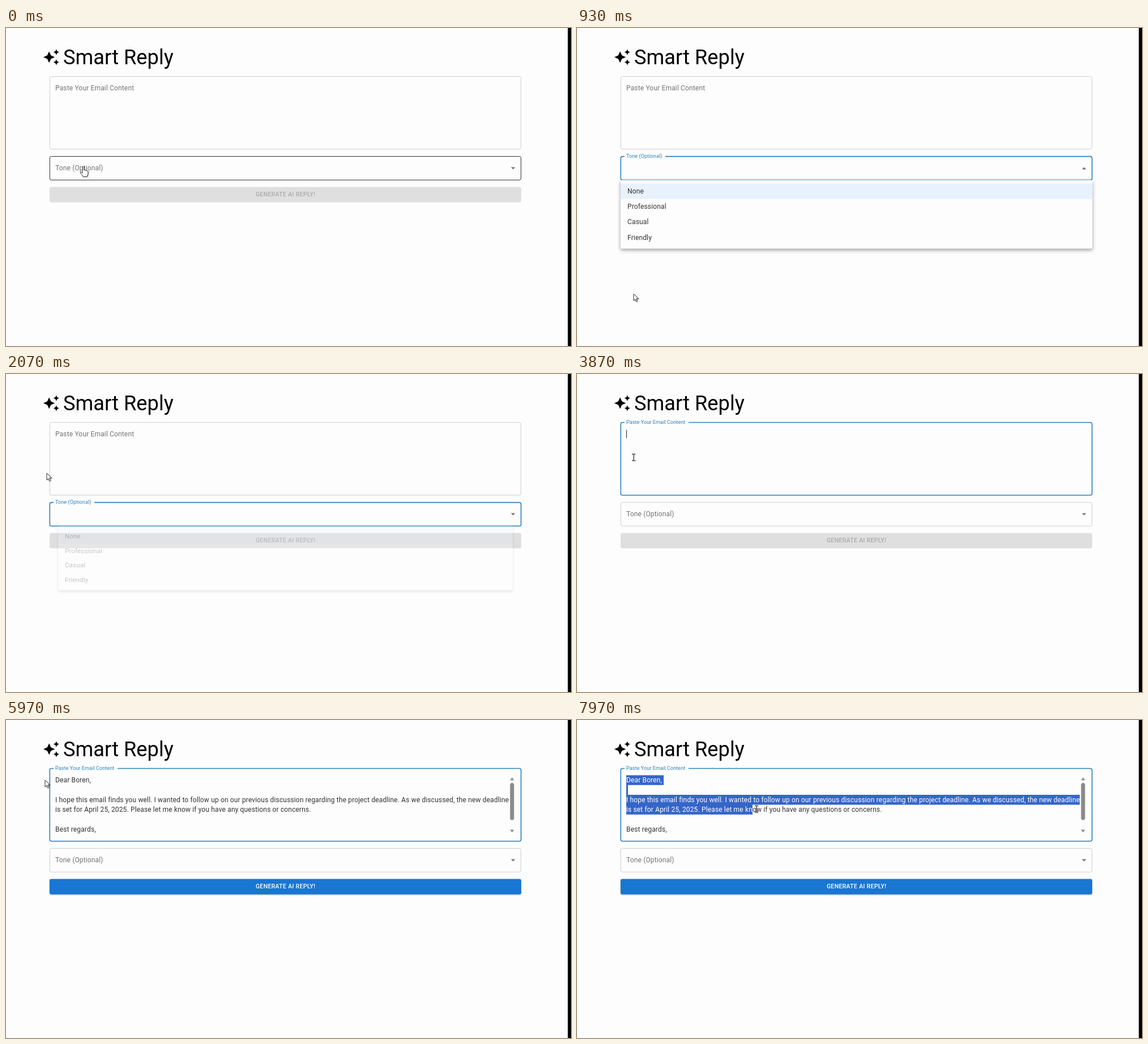
An HTML page for the animation above (8000 ms loop, 998 by 561 pixels).

```html
<!DOCTYPE html>
<html lang="en">
<head>
<meta charset="utf-8">
<title>Smart Reply</title>
<style>
  html, body { margin: 0; width: 100%; height: 100%; overflow: hidden; background: #fdfdfd; }
  svg { display: block; width: 100%; height: 100%; }
  text { font: 12.08px Roboto, sans-serif; letter-spacing: .00938em; fill: #333; white-space: pre; }
  .title { font-size: 36.24px; letter-spacing: 0; fill: #000; }
  .button { font-size: 10.57px; font-weight: 500; letter-spacing: .02857em; text-anchor: middle; fill: #aaa; }
  .on { fill: #fff; }
  .border { fill: none; }
  #selected text { fill: #fff; }
  #paper { filter: drop-shadow(0 3px 3px rgba(0,0,0,.28)) drop-shadow(0 1px 3px rgba(0,0,0,.12)); }
  #active rect { filter: drop-shadow(0 1.4px 1.2px rgba(0,0,0,.32)); }
  #pointer { filter: drop-shadow(1px 1px .8px rgba(0,0,0,.3)); }
  #pointer path { fill: #fff; stroke: #222; stroke-width: .9; stroke-linejoin: round; }
  #pointer #beam { fill: none; stroke: #333; stroke-width: 1.1; }
</style>
</head>
<body>
<svg viewBox="0 0 998 561">
  <defs>
    <clipPath id="view"><rect x="80" y="97.3" width="826" height="104.5"/></clipPath>
    <clipPath id="range"></clipPath>
  </defs>
  <rect width="998" height="561" fill="#fdfdfd"/>
  <rect x="992.4" width="6" height="561"/>

  <path transform="translate(64.7 36.2) scale(1.27)" d="M19 9l1.25-2.75L23 5l-2.75-1.25L19 1l-1.25 2.75L15 5l2.75 1.25zM11.5 9.5L9 4 6.5 9.5 1 12l5.5 2.5L9 20l2.5-5.5L17 12zM19 15l-1.25 2.75L15 19l2.75 1.25L19 23l1.25-2.75L23 19l-2.75-1.25z"/>
  <text class="title" x="101" y="64">Smart Reply</text>

  <path class="border" id="emailBorder"/>
  <text id="emailLabel">Paste Your Email Content</text>
  <g clip-path="url(#view)">
    <g id="scroller">
      <g id="email"></g>
      <g id="selected" clip-path="url(#range)"><rect x="80" y="90" width="826" height="130" fill="#3565c9"/></g>
      <rect id="caret" width="1" height="14.5" fill="#222"/>
    </g>
  </g>
  <g id="scrollbar" fill="#8a8a8a">
    <path d="M890.4 106.3l3.5-5 3.5 5zM890.4 193.5l3.5 5 3.5-5z"/>
    <rect id="thumb" x="890.4" width="7" height="65.5" rx="3.5"/>
  </g>

  <path class="border" id="toneBorder"/>
  <text id="toneLabel">Tone (Optional)</text>
  <path id="chevron" fill="#757575" d="M-3.8-1.9h7.6L0 1.9z"/>

  <rect x="77" y="280.5" width="833" height="27" rx="3" fill="#dfdfdf"/>
  <text class="button" x="493.7" y="297.3">GENERATE AI REPLY!</text>
  <g id="active">
    <rect x="77" y="280.5" width="833" height="27" rx="3" fill="#1976d2"/>
    <text class="button on" x="493.7" y="297.3">GENERATE AI REPLY!</text>
  </g>

  <g id="menu">
    <rect id="paper" x="77" y="268.3" width="833.4" height="120.9" rx="3" fill="#fdfdfd"/>
    <rect x="77" y="274.3" width="833.4" height="27.2" fill="#e8f1fc"/>
    <rect id="hover" x="77" width="833.4" height="27.2" fill="#000" opacity=".04"/>
  </g>

  <g id="pointer">
    <path id="arrow" d="M0 0V12l2.8-2.6 1.9 4.3 2-.9-1.9-4.2H8.6z"/>
    <path id="hand" d="M-1.4 1a1.4 1.4 0 0 1 2.8 0V6c.3-.8 2.4-.6 2.5.4.4-.7 2.2-.5 2.4.5.5-.5 2.1-.2 2.1 1.2V12c0 2-1.6 3-1.6 5H-.5c0-1.6-4.2-5-4.6-6.9-.2-1.3 1.3-1.9 2.2-.9L-1.4 11z"/>
    <path id="beam" d="M-3-5.6h2q1 0 1 1 0-1 1-1h2M0-5V5M-3 5.6h2q1 0 1-1 0 1 1 1h2"/>
  </g>
</svg>
<script>
const DURATION = 8000, LINE = 17.36, TEXT_X = 87, VIEW_TOP = 97.3;
// Moments of the user's actions, in ms
const OPEN = 170, CLOSE = 1945, FOCUS = 2800, PASTE = 4080, SCROLL = 5300, DRAG = 7020;
const LINES = ['Dear Boren,', '',
  'I hope this email finds you well. I wanted to follow up on our previous discussion regarding the project deadline. As we discussed, the new deadline',
  'is set for April 25, 2025. Please let me know if you have any questions or concerns.',
  '', 'Best regards,', 'Test'];
const MENU = ['None', 'Professional', 'Casual', 'Friendly'];
// Pointer path: time, x, y
const PATH = [[0, 136.5, 245], [250, 136, 247], [800, 106, 457], [930, 100, 469], [1150, 97, 474],
  [1550, 60, 400], [1920, 71, 178], [2070, 72, 175], [2500, 70, 172], [2750, 100, 148],
  [3870, 100, 147], [4150, 100, 147], [4800, 203, 153], [5450, 203, 153], [5850, 70, 108],
  [5970, 69, 106], [6700, 70, 105], [7000, 87, 106], [7150, 92, 107], [7970, 317, 157]];

const $ = id => document.getElementById(id);
const set = (el, attrs) => { for (const k in attrs) el.setAttribute(k, attrs[k]); return el; };
const add = (parent, tag, attrs, text = '') => {
  const el = set(document.createElementNS('http://www.w3.org/2000/svg', tag), attrs);
  el.textContent = text;
  return parent.appendChild(el);
};
const show = (el, on) => el.style.display = on ? '' : 'none';
const clamp = v => Math.max(0, Math.min(1, v));
const mix = (a, b, p) => a + (b - a) * p;

const bezier = (x1, y1, x2, y2) => x => {
  const at = (a, b, s) => 3 * a * s * (1 - s) ** 2 + 3 * b * s * s * (1 - s) + s ** 3;
  if (x <= 0 || x >= 1) return clamp(x);
  let lo = 0, hi = 1;
  for (let i = 0; i < 20; i++) {
    const mid = (lo + hi) / 2;
    if (at(x1, x2, mid) < x) lo = mid; else hi = mid;
  }
  return at(y1, y2, lo);
};
const standard = bezier(.4, 0, .2, 1), easeOut = bezier(0, 0, .2, 1);
const smooth = p => p * p * (3 - 2 * p);
const phase = (t, start, length, ease) => ease(clamp((t - start) / length));

const lineTexts = LINES.map((s, i) => add($('email'), 'text', { x: TEXT_X, y: 110 + i * LINE }, s));
lineTexts.forEach(el => $('selected').append(el.cloneNode(true)));
const ranges = LINES.map((s, i) => add($('range'), 'rect', { x: TEXT_X, y: VIEW_TOP + i * LINE, height: LINE + .1 }));
MENU.forEach((s, i) => add($('menu'), 'text', { x: 89, y: 292 + i * 27.2 }, s));

function pointerAt(t) {
  const i = Math.max(1, PATH.findIndex(k => k[0] > t));
  if (t >= PATH.at(-1)[0]) return PATH.at(-1).slice(1);
  const [a, b] = [PATH[i - 1], PATH[i]], p = smooth((t - a[0]) / (b[0] - a[0]));
  return [mix(a[1], b[1], p), mix(a[2], b[2], p)];
}

function drawField(name, top, bottom, baseline, notch, float, focused, hovered) {
  const end = 84 + notch * clamp(float * 1.3 - .3);
  set($(name + 'Border'), {
    d: `M${end} ${top}H906.7q3 0 3 3V${bottom - 3}q0 3-3 3H80.3q-3 0-3-3V${top + 3}q0-3 3-3H84`,
    stroke: focused ? '#2b80bd' : hovered ? '#2a2a2a' : '#cdcdd6',
    'stroke-width': focused ? 1.6 : 1
  });
  const y = mix(baseline, top + 2.8, float);
  set($(name + 'Label'), { transform: `translate(${TEXT_X} ${y}) scale(${mix(1, .75, float)})` })
    .style.fill = focused ? '#2b80bd' : '#737373';
}

function drawMenu(t, y) {
  const closing = t >= CLOSE;
  const fade = closing ? 1 - phase(t, CLOSE, 267, standard) : phase(t, OPEN, 267, standard);
  const grow = closing ? 1 - phase(t, CLOSE + 89, 178, standard) : phase(t, OPEN, 178, standard);
  show($('menu'), fade > 0);
  set($('menu'), {
    opacity: fade,
    transform: `translate(493.7 268.3) scale(${mix(.75, 1, grow)} ${mix(.5625, 1, grow)}) translate(-493.7 -268.3)`
  });
  const item = Math.floor((y - 274.3) / 27.2);
  show($('hover'), item >= 0 && item < 4 && !closing);
  set($('hover'), { y: 274.3 + item * 27.2 });
  return item >= 0 && item < 4;
}

function drawSelection(t, x, y) {
  show($('selected'), t >= DRAG);
  const last = Math.floor((y - VIEW_TOP) / LINE);
  ranges.forEach((rect, i) => {
    const text = lineTexts[i];
    let width = 0;
    if (i < last) width = Math.min(801, text.getComputedTextLength() + 3);
    else if (i === last) {
      for (let n = 1; n <= LINES[i].length; n++) {
        const w = text.getSubStringLength(0, n);
        if (w > x - 4 - TEXT_X) break;
        width = w;
      }
    }
    set(rect, { width });
  });
}

function draw(t) {
  const [x, y] = pointerAt(t);
  const open = t >= OPEN && t < CLOSE, pasted = t >= PASTE;
  const inside = (top, bottom) => !open && x > 77 && x < 910 && y > top && y < bottom;
  const overEmail = inside(85, 214), overTone = inside(226, 269);

  const emailFocus = t >= FOCUS, toneFocus = t >= OPEN && !emailFocus;
  const toneFloat = phase(t, OPEN, 200, easeOut) - phase(t, FOCUS, 200, easeOut);
  drawField('email', 85.5, 213.7, 110, 113, phase(t, FOCUS, 200, easeOut), emailFocus, overEmail);
  drawField('tone', 226.6, 268.2, 251.2, 72, toneFloat, toneFocus, overTone);
  set($('chevron'), { transform: `translate(895.7 247.5) scale(1 ${open ? -1 : 1})` });

  const scroll = pasted ? 1 - phase(t, SCROLL, 150, smooth) : 0;
  set($('scroller'), { transform: `translate(0 ${-16.8 * scroll})` });
  show($('email'), pasted);
  show($('scrollbar'), pasted);
  set($('thumb'), { y: 111 + 10.7 * scroll });
  const blink = Math.floor((t - FOCUS) / 500) % 2 === 0;
  show($('caret'), emailFocus && t < DRAG && blink);
  set($('caret'), pasted
    ? { x: TEXT_X + lineTexts[6].getComputedTextLength(), y: 98.6 + 6 * LINE }
    : { x: TEXT_X, y: 98.6 });
  drawSelection(t, x, y);

  set($('active'), { opacity: phase(t, PASTE, 250, standard) });
  const overItem = drawMenu(t, y) && open;

  const kind = overTone || overItem ? 'hand' : overEmail ? 'beam' : 'arrow';
  for (const id of ['hand', 'beam', 'arrow']) show($(id), id === kind);
  set($('pointer'), { transform: `translate(${x} ${y})` });
}

const start = performance.now();
function frame() {
  draw((performance.now() - start) % DURATION);
  requestAnimationFrame(frame);
}
frame();
</script>
</body>
</html>
```
